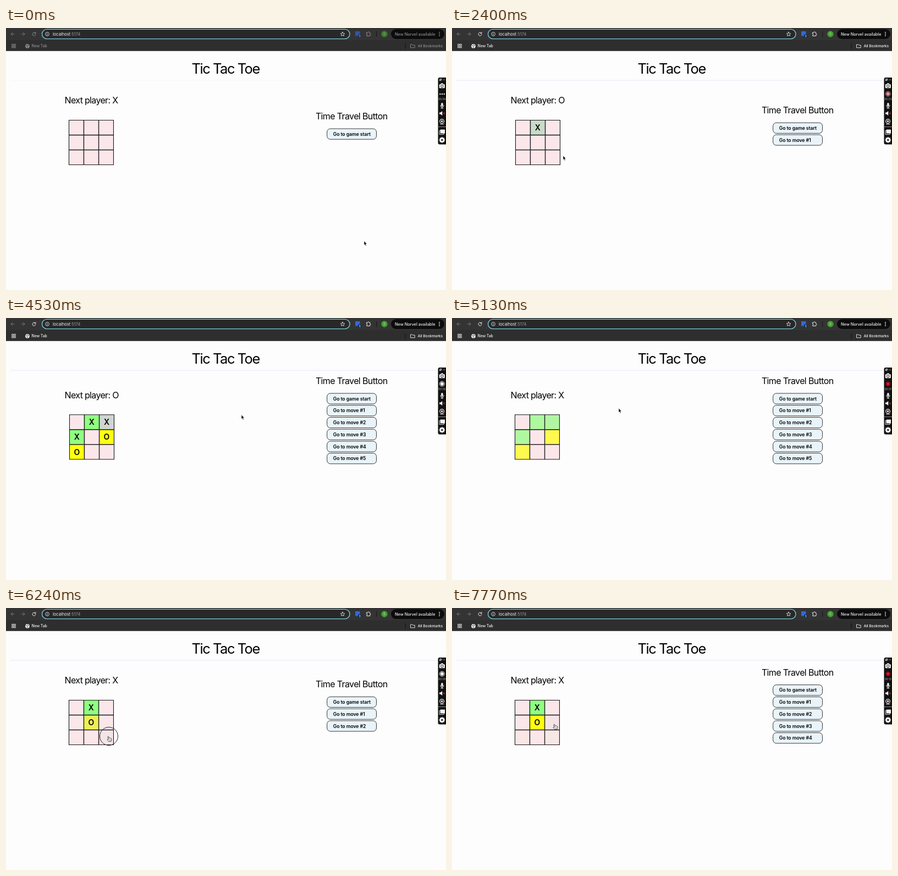
Recreate the animation shown at these times as an HTML page with a canvas. Size 800x476 px, loop 7800 ms.

```html
<!DOCTYPE html>
<html lang="en">
<head>
<meta charset="utf-8">
<title>Tic Tac Toe</title>
<style>
html, body { margin: 0; width: 100%; height: 100%; overflow: hidden; background: #fdfdfd; }
canvas { display: block; width: 800px; height: 476px; }
</style>
</head>
<body>
<canvas id="stage"></canvas>
<script>
const LOOP = 7800;
const canvas = document.getElementById('stage');
const dpr = window.devicePixelRatio || 1;
canvas.width = 800 * dpr;
canvas.height = 476 * dpr;
const ctx = canvas.getContext('2d');

const PINK = [251, 231, 234], GREY = [209, 212, 211];
const GREEN = [144, 255, 130], YELLOW = [255, 255, 16];
const START = 600, FOCUS = 2040;

// Game actions: a cell to play, or a move to jump back to.
const actions = [
  { t: 2110, cell: 1 }, { t: 2990, cell: 5 }, { t: 3420, cell: 3 },
  { t: 3820, cell: 6 }, { t: 4290, cell: 2 }, { t: 4930, jump: 0 },
  { t: 5430, cell: 1 }, { t: 5730, cell: 4 }, { t: 6270, cell: 8 },
  { t: 6650, cell: 6 }, { t: 7100, jump: 2 }
];

// Pointer tip: time, x, y
const path = [
  [0, 651, 387], [120, 651, 387], [520, 792, 119], [860, 792, 119],
  [1560, 155, 183], [2160, 155, 183], [2400, 202, 232], [2560, 202, 232],
  [2860, 181, 209], [3020, 181, 209], [3320, 127, 208], [3450, 127, 208],
  [3570, 121, 227], [3740, 127, 238], [3880, 127, 238], [4200, 182, 189],
  [4330, 182, 189], [4530, 428, 176], [4800, 610, 146], [4950, 610, 146],
  [5130, 303, 164], [5340, 155, 183], [5480, 155, 183], [5660, 155, 209],
  [5800, 155, 209], [6160, 186, 233], [6320, 186, 233], [6560, 128, 233],
  [6700, 128, 233], [7000, 628, 192], [7140, 628, 192], [7620, 186, 211], [7800, 186, 211]
];

const clamp = v => Math.max(0, Math.min(1, v));
const mix = (a, b, k) => a.map((v, i) => v + (b[i] - v) * k);
const css = c => `rgb(${c.map(Math.round)})`;
const font = (size, weight = 400) => `${weight} ${size}px Inter, "Open Sans", sans-serif`;

function text(str, x, y, size, { weight = 400, color = '#000', align = 'left', gap = 0 } = {}) {
  ctx.font = font(size, weight);
  ctx.letterSpacing = gap + 'px';
  ctx.fillStyle = color;
  ctx.textAlign = align;
  ctx.textBaseline = 'alphabetic';
  ctx.fillText(str, x, y);
  return ctx.measureText(str).width;
}

function box(x, y, w, h, r, fill, stroke, lw = 1) {
  ctx.beginPath();
  ctx.roundRect(x, y, w, h, r);
  if (fill) { ctx.fillStyle = fill; ctx.fill(); }
  if (stroke) { ctx.strokeStyle = stroke; ctx.lineWidth = lw; ctx.stroke(); }
}

function disc(x, y, r, fill, stroke, lw = 1) {
  ctx.beginPath();
  ctx.arc(x, y, r, 0, Math.PI * 2);
  if (fill) { ctx.fillStyle = fill; ctx.fill(); }
  if (stroke) { ctx.strokeStyle = stroke; ctx.lineWidth = lw; ctx.stroke(); }
}

function draw(d, x, y, { fill, stroke, lw = 1 }) {
  const p = new Path2D(d);
  ctx.save();
  ctx.translate(x, y);
  ctx.lineCap = ctx.lineJoin = 'round';
  if (fill) { ctx.fillStyle = fill; ctx.fill(p); }
  if (stroke) { ctx.strokeStyle = stroke; ctx.lineWidth = lw; ctx.stroke(p); }
  ctx.restore();
}

function cellColor(cell, t) {
  if (cell.since === null) return PINK;
  const age = t - cell.since;
  if (!cell.mark) return mix(cell.from, PINK, clamp(age / 700));
  const goal = cell.mark === 'X' ? GREEN : YELLOW;
  return age < 230 ? mix(cell.from, GREY, clamp(age / 200))
    : mix(GREY, goal, clamp((age - 230) / 440));
}

// Replays the actions up to time t.
function gameAt(t) {
  const cells = Array.from({ length: 9 }, () => ({ mark: '', since: null, from: PINK }));
  let moves = [], at = 0;
  const set = (i, mark, when) => {
    cells[i] = { mark, since: when, from: cellColor(cells[i], when) };
  };
  for (const a of actions) {
    if (a.t > t) break;
    if (a.jump === undefined) {
      set(a.cell, at % 2 ? 'O' : 'X', a.t);
      moves = [...moves.slice(0, at), a.cell];
      at++;
    } else {
      moves.slice(a.jump, at).forEach(i => set(i, '', a.t));
      at = a.jump;
    }
  }
  return { cells, count: moves.length, at };
}

function pointerAt(t) {
  const i = Math.max(1, path.findIndex(p => p[0] >= t));
  const [a, b] = [path[i - 1], path[i]];
  const k = clamp((t - a[0]) / (b[0] - a[0]));
  const e = k * k * (3 - 2 * k);
  return [a[1] + (b[1] - a[1]) * e, a[2] + (b[2] - a[2]) * e];
}

function browser(t) {
  const on = clamp((t - FOCUS) / 120);
  const tone = css(mix([142, 142, 142], [240, 240, 240], on));
  const dim = '#777';
  ctx.fillStyle = '#343434';
  ctx.fillRect(0, 0, 800, 41.6);
  ctx.fillStyle = '#2e2e2e';
  ctx.fillRect(0, 22, 800, 19.6);

  draw('M3 0H-3M-.2 -2.8L-3 0L-.2 2.8', 12, 11, { stroke: dim });
  draw('M-3 0H3M.2 -2.8L3 0L.2 2.8', 31, 11, { stroke: dim });
  draw('M2.4 -1.7A3 3 0 1 0 3 .6M2.9 -3.2V-1.2H.9', 51, 11, { stroke: tone });

  box(65.5, 2.4, 559.5, 17.2, 8.6, '#282828', '#79c7d6', 1.4);
  disc(75, 11, 3.4, null, '#ddd', .9);
  ctx.fillStyle = '#ddd';
  ctx.fillRect(74.5, 10.5, 1, 2.4);
  ctx.fillRect(74.5, 9, 1, .9);
  const w = text('localhost', 85, 13.6, 7.5, { color: '#f2f2f2' });
  text(':5174', 85 + w, 13.6, 7.5, { color: '#9a9a9a' });
  draw('M0 -3.8L1.1 -1.3L3.8 -1L1.8 .8L2.4 3.4L0 2L-2.4 3.4L-1.8 .8L-3.8 -1L-1.1 -1.3Z', 612, 11, { stroke: '#ddd', lw: .9 });

  ctx.globalAlpha = .65 + .35 * on;
  box(635, 6, 8.5, 8.5, 1, '#3468d8');
  box(640, 11.5, 6.5, 6.5, 1.5, '#17335f');
  text('1', 643.2, 16.9, 5, { color: '#fff', align: 'center', weight: 600 });
  disc(688, 11, 5.7, '#43a02d');
  text('S', 688, 13.2, 6, { color: '#d9efd4', align: 'center' });
  ctx.globalAlpha = 1;
  draw('M-3.2 -2.4H-.9A1.2 1.2 0 0 1 1.5 -2.4H2.7V-.2A1.2 1.2 0 0 1 2.7 2.2V3.8H-3.2V2.1A1.2 1.2 0 0 0 -3.2 -.3Z', 659, 10.6, { stroke: tone });
  ctx.fillStyle = '#151515';
  ctx.fillRect(673.2, 6, 1, 10);

  box(700, 2, 97, 18, 9, '#0c0c0c');
  text('New Norvel available', 707, 13.6, 7.3, { color: tone, weight: 500 });
  for (const dy of [-3, 0, 3]) disc(788, 11 + dy, .9, tone);

  for (let r = 0; r < 2; r++)
    for (let c = 0; c < 2; c++) box(10.7 + c * 4, 29.3 + r * 4, 2.6, 2.6, 0, null, tone, .9);
  disc(39, 32.8, 3.9, tone);
  draw('M-2.8 -1.6L-.8 -.4L-.4 1.2L.2 3M.4 -3L.8 -1.2L2.8 -.6', 39, 32.8, { stroke: '#2e2e2e', lw: .9 });
  text('New Tab', 46.5, 35.3, 6.9, { color: tone, weight: 500, gap: -.08 });
  ctx.fillStyle = '#111';
  ctx.fillRect(725.5, 28, 1, 10);
  draw('M-3.6 -2.8H-.8L.3 -1.6H3.7V3H-3.6Z', 739.5, 32.8, { stroke: tone, lw: .9 });
  text('All Bookmarks', 748.5, 35.3, 6.8, { color: tone, weight: 500, gap: -.08 });
}

function recorder(t) {
  const w = '#f4f4f4';
  box(785.5, 90, 17, 121.5, 3, '#111');
  disc(790, 94, 1.7, null, w, .8);
  draw('M-1.8 1.8L1.8 -1.8', 790, 94, { stroke: w, lw: .7 });
  for (let i = 0; i < 3; i++) disc(794.5 + i * 1.6, 94, .5, w);

  box(787.8, 102.2, 10, 7, 1, w);
  box(790.6, 100.6, 4.4, 3, 1, w);
  disc(792.8, 105.6, 2.3, w, '#111', 1);

  let label = 4;
  if (t < START) {
    for (let i = 0; i < 3; i++) disc(789.3 + i * 3.7, 120, 1.2, w);
  } else {
    label = Math.max(0, Math.floor(t * .0017 - 1));
    const phase = (((t - 3570) / 940) % 1 + 1) % 1;
    const red = clamp((phase - .25) / .1) * clamp((.8 - phase) / .1);
    disc(792.8, 119.6, 4.5, null, css(mix([245, 245, 245], [130, 10, 25], red)), 1);
    disc(792.8, 119.6, 3.1, css(mix([250, 245, 245], [225, 15, 35], red)));
  }
  text('00:' + String(label).padStart(2, '0'), 792.8, 131, 4.6, { color: '#c8c8c8', align: 'center' });

  box(791.2, 136, 3.4, 6.4, 1.7, w);
  draw('M-3.2 -.4A3.2 3.2 0 0 0 3.2 -.4M0 2.9V4.8M-2 4.8H2', 792.9, 141, { stroke: w });
  draw('M-5 -1.6H-3L.2 -4V4L-3 1.6H-5Z', 793, 155, { fill: w });
  draw('M2 -1.4L4.6 1.4M4.6 -1.4L2 1.4', 793, 155, { stroke: '#e0283c' });
  disc(792.6, 169.4, 3.8, null, w, 1.2);
  disc(792.6, 169.4, 1.7, w);
  draw('M-2.8 5H2.8', 792.6, 169.8, { stroke: w });
  draw('M1.6 2L5 5.4', 792.2, 168.8, { stroke: '#e0283c' });
  ctx.fillStyle = '#888';
  ctx.fillRect(786, 179, 14, 1);
  box(788, 186.4, 8, 7, 0, null, w, .9);
  box(789.6, 184.4, 8.4, 7.2, .5, w);
  for (let i = 0; i < 8; i++) {
    ctx.save();
    ctx.translate(792.8, 203.4);
    ctx.rotate(i * Math.PI / 4);
    ctx.fillStyle = w;
    ctx.fillRect(-1.2, -5.2, 2.4, 3);
    ctx.restore();
  }
  disc(792.8, 203.4, 2.8, null, w, 2.2);
}

function board(game, t, px, py) {
  const x = game.at % 2 ? 115 : 114;
  const drop = game.count > 4 ? 8.3 : 0;
  const y = 167 + drop;
  text('Next player: ' + (game.at % 2 ? 'O' : 'X'), 106.6, 137.2 + drop, 16, { gap: -.68 });
  let hover = false;
  game.cells.forEach((cell, i) => {
    const cx = x + (i % 3) * 27.1, cy = y + Math.floor(i / 3) * 27.1;
    const over = px > cx && px < cx + 27 && py > cy && py < cy + 27;
    hover = hover || over;
    let color = cellColor(cell, t);
    if (over && !cell.mark) color = mix(color, GREY, .15);
    box(cx + .5, cy + .5, 26.8, 26.8, 0, css(color), '#151515', 1.1);
    if (cell.mark) text(cell.mark, cx + 13.8, cy + 19, 14, { weight: 600, align: 'center' });
  });
  return hover;
}

function history(count, px, py) {
  const y = count > 4 ? 146.5 : 192.6 - count * 10.85;
  text('Time Travel Button', 628.2, y - 26.6, 16, { align: 'center', gap: -.63 });
  let hover = false;
  for (let i = 0; i <= count; i++) {
    const cy = y + i * 21.75;
    hover = hover || (px > 583 && px < 674 && Math.abs(py - cy) < 10);
    box(583.7, cy - 9.6, 89.8, 19.2, 6, '#e9f4fa', '#222', .9);
    text(i ? 'Go to move #' + i : 'Go to game start', 594.7, cy + 3.1, 8.7, { weight: 600, gap: -.08 });
  }
  return hover;
}

function pointer(x, y, hand) {
  if (hand) {
    draw('M-1 .8Q-.2 -.5 .7 .8L1.4 3.4Q2.3 2.6 3 3.4Q3.8 2.8 4.4 3.7Q5.8 3.4 5.9 4.8L5.7 7.4L5 9.4H.6L-1.8 6.4Q-2.2 5 -.5 5.3L.2 5.6Z', x, y, { fill: '#f7f7f7', stroke: '#222', lw: .8 });
    draw('M2.2 6V8M3.8 6V8', x, y, { stroke: '#444', lw: .5 });
  } else {
    draw('M0 0V7.6L1.7 6.1L2.9 8.9L4.2 8.3L3 5.6L5.2 5.4Z', x, y, { fill: '#111', stroke: '#fff', lw: .5 });
  }
}

function render(t) {
  ctx.setTransform(dpr, 0, 0, dpr, 0, 0);
  ctx.fillStyle = '#fdfdfd';
  ctx.fillRect(0, 0, 800, 476);
  browser(t);
  text('Tic Tac Toe', 399.2, 83, 25.5, { align: 'center', gap: -1.5 });
  ctx.fillStyle = t < FOCUS ? '#f5f5f7' : '#e8eaf4';
  ctx.fillRect(8, 94.6, 784, 1);

  const game = gameAt(t);
  const [px, py] = pointerAt(t);
  const overBoard = board(game, t, px, py);
  const overList = history(game.count, px, py);
  recorder(t);
  if (actions.some(a => t >= a.t - 50 && t < a.t + 60)) disc(px + 1, py, 16.5, null, '#222', 1);
  pointer(px, py, overBoard || overList);
}

const begin = performance.now();
function tick(now) {
  render(Math.max(0, now - begin) % LOOP);
  requestAnimationFrame(tick);
}
render(0);
requestAnimationFrame(tick);
</script>
</body>
</html>
```
